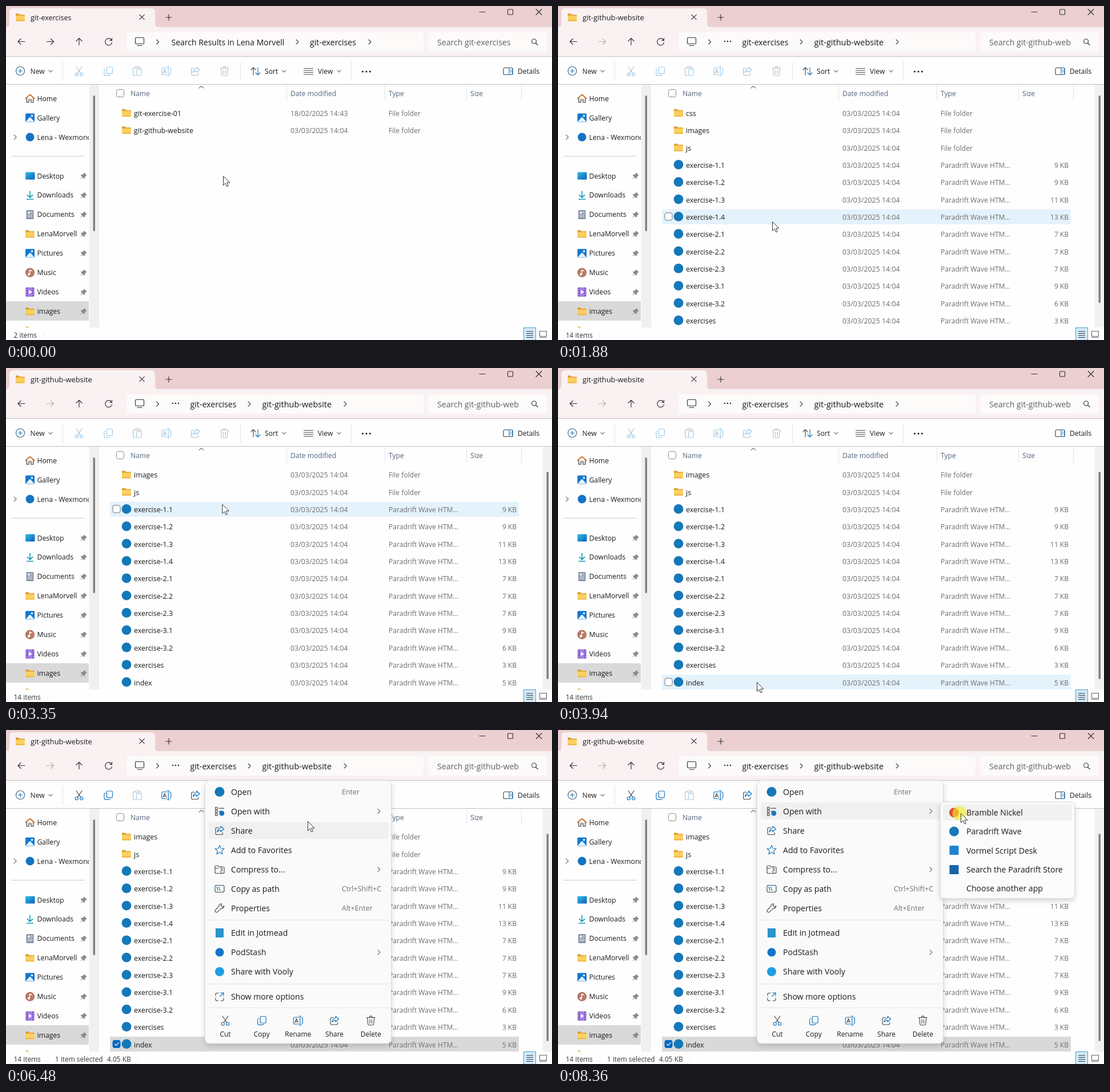
Animation of 956 by 586 pixels, one loop 8590 ms. Source, as an HTML page:

```html
<!DOCTYPE html>
<html lang="en">
<head>
<meta charset="utf-8">
<title>File window</title>
<style>
html, body { margin: 0; width: 100%; height: 100%; overflow: hidden; background: #fff; }
svg { display: block; width: 956px; height: 586px; --c: #1673b8; --k: #4a4a4a; }
text { font-family: "Open Sans", "Noto Sans", sans-serif; white-space: pre; }
.off { --c: #9dcbea; --k: #b9bec4; }
.c, .k, .ln { fill: none; stroke-width: 1.15; stroke-linecap: round; stroke-linejoin: round; }
.c { stroke: var(--c); }
.k { stroke: var(--k); }
.ln { stroke: #333; }
.pop { filter: drop-shadow(0 4px 5px rgba(0,0,0,.16)); }
</style>
</head>
<body>
<svg id="stage" viewBox="0 0 956 586" xmlns="http://www.w3.org/2000/svg"></svg>
<script>
const LOOP = 8590;
const INK = '#1b1b1b', GREY = '#6e6e6e', HEAD = '#52647d';

// ---------- drawing helpers ----------
const text = (x, y, s, size = 12.2, fill = INK, extra = '') =>
  `<text x="${x}" y="${y}" font-size="${size}" fill="${fill}" ${extra}>${s}</text>`;
const rect = (x, y, w, h, fill, extra = '') =>
  `<rect x="${x}" y="${y}" width="${w}" height="${h}" fill="${fill}" ${extra}/>`;
const dot = (x, y, r, fill, extra = '') =>
  `<circle cx="${x}" cy="${y}" r="${r}" fill="${fill}" ${extra}/>`;
const path = (d, cls = 'ln', extra = '') => `<path d="${d}" class="${cls}" ${extra}/>`;
const icon = (id, x, y, cls = '') => `<use href="#${id}" x="${x}" y="${y}" class="${cls}"/>`;
const right = (x, y, s = 4, col = '#444') =>
  path(`M${x - s / 2} ${y - s}l${s} ${s}l${-s} ${s}`, 'ln', `style="stroke:${col}"`);
const down = (x, y) => path(`M${x - 3} ${y - 1.5}l3 3l3-3`, 'ln', 'style="stroke:#777"');
const vline = (x, y, h, col = '#e4e4e4') => rect(x, y, 1, h, col);
const cross = (x, y, s) => path(`M${x - s} ${y - s}l${2 * s} ${2 * s}m0 ${-2 * s}l${-2 * s} ${2 * s}`);

const icons = {
  folder: `<path d="M-8-5.5q0-1.2 1.2-1.2h4l2 2h7.600q1.200 0 1.200 1.200v3h-16z" fill="#dd9f33"/>` +
    rect(-8, -3.2, 16, 9.7, '#fbd060', 'rx="1.2"') + rect(-8, 4.6, 16, 1.9, '#eeb544', 'rx=".9"'),
  cut: path('M-5-8L2.700 3.400M5-8L-2.700 3.400', 'k') +
    dot(-4.2, 5.6, 2.6, 'none', 'class="c"') + dot(4.2, 5.6, 2.6, 'none', 'class="c"'),
  copy: rect(-2.5, -7.5, 10, 11.5, 'none', 'rx="2" class="c"') +
    path('M-5-4q-2 .4-2 2.400v6q0 3 3 3h5q2 0 2.400-1.600', 'c'),
  paste: path('M-3-6.500h-2.500q-1.500 0-1.500 1.500v11q0 1.500 1.500 1.500h3.500M3-6.500h2q1.500 0 1.500 1.500v1', 'k') +
    rect(-3, -8, 6, 3, 'none', 'rx="1.2" class="k"') + rect(-1, -3, 8.5, 10.5, 'none', 'rx="1.5" class="c"'),
  rename: path('M1-6h-6.500q-2.500 0-2.500 2.500v7q0 2.500 2.500 2.500h6.500M6-6q2 .5 2 2.500v7q0 2-2 2.500', 'c') +
    path('M3.500-8v16M1.800-8h3.400M1.800 8h3.400', 'c') + path('M-5.500 3.300L-2.800-3.500L0 3.300M-4.700 1.300h3.800', 'k'),
  share: path('M-2-5.500h-2.500q-2.500 0-2.500 2.500v7.500q0 2.500 2.500 2.500h7.500q2.500 0 2.500-2.500v-1', 'k') +
    path('M2-7.500l5.500 4.800L2 2v-2.700q-4 0-6 3.200q.6-6.500 6-7.200z', 'c'),
  trash: path('M-7.500-5.500h15M-2.500-5.800q0-2.400 2.500-2.400t2.500 2.400M-6-5.300l1 11.300q.2 1.700 1.800 1.700h6.400q1.600 0 1.800-1.700l1-11.300M-1.700-2v6.500M1.700-2v6.500', 'k'),
  pin: `<path d="M1-5.500L5.500-1L4.300-.3L2 2.200l.2 2L.8 5.200L-1.800 2.600L-5 5.500l-.5-.5L-2.600 1.800L-5.200-.8L-4.200-2.200l2 .2L.3-4.300z" fill="#858b91"/>`,
  home: path('M-6-.5v7.500h4v-4.500h4v4.500h4v-7.500', 'ln', 'style="stroke:#8d8d8d;stroke-width:2;fill:#e9e6e3"') +
    path('M-7.500 0L0-6.500L7.500 0', 'ln', 'style="stroke:#c9722c;stroke-width:2"'),
  picture: rect(-8, -7.5, 16, 15, '#1679cc', 'rx="1.5"') +
    `<path d="M-7.500 7L-1-.5q1-1 2 0L7.500 7z" fill="#e6f5ff"/>` + dot(3.5, -3.3, 1.7, '#fff'),
  desktop: rect(-8, -6.5, 16.5, 13, 'url(#sea)', 'rx="1.5"'),
  download: path('M0-7v11M-4.500-.3L0 4.200L4.500-.3M-5.500 7h11', 'ln', 'style="stroke:#169bb5;stroke-width:1.6"'),
  doc: rect(-6.5, -8, 13, 16, '#8794a6', 'rx="1.5"') + rect(-4, -5.5, 4, 4, '#e8eef5') +
    path('M2-5h2M2-2.500h2M-4 1h8M-4 4h8', 'ln', 'style="stroke:#e8eef5"'),
  music: dot(0, 0, 8.2, '#b97a68') + path('M-.5 3v-7.500l3.500 1.500', 'ln', 'style="stroke:#fff;stroke-width:1.5"') + dot(-2, 3, 2, '#fff'),
  video: rect(-7.5, -8, 15, 16, '#7b4fc4', 'rx="1.5"') + rect(-4, -7.5, 8, 15, '#a583e6') +
    `<path d="M-2-3.500L3.500 0L-2 3.500z" fill="#fff"/>` +
    path('M-5.800-5.500v11M5.800-5.500v11', 'ln', 'style="stroke:#e3d6fa;stroke-dasharray:1.5 3"'),
  openWith: rect(-7.5, -7, 3.6, 3.6, 'none', 'class="k"') + rect(-7.5, -1.5, 3.6, 3.6, 'none', 'class="k"') +
    rect(-7.5, 4, 3.6, 3.6, 'none', 'class="k"') + path('M-1-5.200h8.500M-1 0h2', 'k') + dot(3.8, 3.5, 4.5, '#1676ba'),
  star: path('M0-8l2.300 5.200l5.700.6l-4.300 3.800l1.300 5.600L0 4.300l-5 2.900l1.300-5.600L-8-2.200l5.700-.6z', 'c'),
  zip: path('M-8-4.500q0-2 2-2h3l2 2h7q2 0 2 2v7.500q0 2-2 2h-12q-2 0-2-2z', 'k') +
    path('M-8-2h6M2.500-4.500v3h2v3h-2v5.500', 'k'),
  route: rect(-8, -6, 16, 12, 'none', 'rx="2.5" class="k"') + path('M-5-3.500l2 6.500M-1.500-3.500l2 6.500', 'c') + path('M3 3h.1M5.500 3h.1', 'c'),
  wrench: path('M3.800-7.500q-5-.5-5 4.300L-7.300 3q-1.500 2 .3 3.600t3.700-.2L2.700.6q5 0 5-4.700l-2.800 2.200l-2.800-2.500z', 'k'),
  more: path('M-2-6.500h-2.500q-2.500 0-2.500 2.500v2M2 7h2.500q2.500 0 2.500-2.500v-2M-7 2v2.500q0 2.500 2.500 2.500h2', 'k') +
    path('M1.500-7h5.500v5.500M6.500-6.500L.5-.5', 'c'),
};

const defs = `<defs>
<linearGradient id="sea" x2="1" y2="1"><stop stop-color="#35c0e8"/><stop offset="1" stop-color="#0a5fb8"/></linearGradient>
<clipPath id="sideClip"><rect y="138" width="145" height="426"/></clipPath>
<clipPath id="listClip"><rect x="164" y="168" width="776" height="396"/></clipPath>
<clipPath id="findClip"><rect x="740" y="46" width="158.500" height="36"/></clipPath>
<clipPath id="menuClip"><rect id="menuBox" x="330" y="0" width="360" height="586"/></clipPath>
<clipPath id="subClip"><rect id="subBox" x="650" y="0" width="290" height="400"/></clipPath>
${Object.entries(icons).map(([id, s]) => `<g id="${id}">${s}</g>`).join('')}</defs>`;

// ---------- fixed parts ----------
function frameParts() {
  let s = rect(0, 0, 956, 586, '#fefefe') + rect(0, 0, 956, 38, '#ecd0d1') + rect(0, 37, 956, 51, '#f9f1f2');
  s += '<path d="M0 37q6 0 6-6V11q0-7 7-7h241q7 0 7 7v20q0 6 6 6z" fill="#f9f1f2"/>';
  s += icon('folder', 25, 20) + cross(238, 19.5, 4.2) + path('M280 20h10M285 15v10');
  s += path('M829 10.500h10') + rect(878.5, 6, 9, 9, 'none', 'rx="1" class="ln"') + cross(933, 10.5, 5);
  s += rect(211, 46, 520, 34, '#fdfafa', 'rx="4"') + rect(739, 46, 207, 34, '#fdfafa', 'rx="4"');
  s += path('M33 62.500h-12m5-5l-5 5l5 5M128 68.500v-12m-5 5l5-5l5 5');
  s += path('M185 60a6 6 0 1 0 .6 4M185.500 56.500v3.800h-3.800');
  s += rect(226.5, 55.5, 15, 11, 'none', 'rx="1.5" class="ln"') + path('M230 69.500h8') + right(265.5, 63);
  s += dot(924.5, 62, 4, 'none', 'class="ln"') + path('M927.500 65l3.500 3.500');
  s += rect(0, 88, 956, 1, '#cbb9bb') + rect(0, 137, 956, 1, '#c8bbbc');
  // command bar
  s += dot(25, 114, 7.5, 'none', 'class="ln" style="stroke:#3a5f7d"') + path('M21.500 114h7M25 110.500v7', 'c');
  s += text(42.5, 119, 'New') + down(78, 114.5);
  s += [99, 410, 604].map(x => vline(x, 98, 33)).join('');
  s += path('M433 121v-13m-4 4l4-4l4 4', 'k') + path('M441 108v13m-4-4l4 4l4-4', 'c');
  s += text(453, 119, 'Sort') + down(487, 114.5);
  s += [109.5, 113, 116.5, 120].map(y => path(`M521.500 ${y}h16`, 'k')).join('');
  s += text(546, 119, 'View') + down(583, 114.5);
  s += [624.5, 631, 637.5].map(x => dot(x, 115, 1.6, '#222')).join('');
  s += rect(871, 108.5, 16, 12, 'none', 'rx="2" class="k"') + path('M881 108.500h4q2 0 2 2v8q0 2-2 2h-4zM883 112.500h2M883 115.500h2', 'c');
  s += text(896, 119, 'Details', 12);
  // column heads
  s += rect(193.5, 146.5, 13, 13, '#fff', 'rx="3" stroke="#888"') + path('M338 144l4-3.500l4 3.500', 'ln', 'style="stroke:#777"');
  [[218, 'Name'], [498, 'Date modified'], [670, 'Type'], [813, 'Size']].forEach(([x, h]) => s += text(x, 158, h, 12.1, HEAD));
  s += [491, 663, 806, 902].map(x => vline(x, 139, 28)).join('');
  // status bar buttons
  s += rect(906.5, 564.5, 21, 23, '#d3ebfa', 'stroke="#4aa0d0"');
  s += [571, 574.5, 578, 581.5].map(y => path(`M911.500 ${y}h11`)).join('');
  s += rect(934.5, 570.5, 12, 9, 'none', 'class="ln" style="stroke:#666"') + path('M934.500 581.500h12', 'ln', 'style="stroke:#666"');
  return s;
}

function sidePane() {
  const top = [['home', 'Home'], ['picture', 'Gallery'], ['', 'Lena - Wexmond']];
  const pinned = [['desktop', 'Desktop'], ['download', 'Downloads'], ['doc', 'Documents'], ['folder', 'LenaMorvell'],
    ['picture', 'Pictures'], ['music', 'Music'], ['video', 'Videos'], ['folder', 'images']];
  let s = rect(0, 518, 145, 34, '#d9d9d9');
  const entry = (id, label, y) => (id ? icon(id, 42, y) : dot(42, y, 7.5, '#1473c4')) + text(54.5, y + 4.5, label);
  top.forEach(([id, label], i) => s += entry(id, label, 162 + 34 * i));
  s += right(16, 230, 4, '#777') + rect(9, 263, 128, 1, '#c9c9c9');
  pinned.forEach(([id, label], i) => s += entry(id, label, 298 + 33.95 * i) + icon('pin', 136, 298 + 33.95 * i));
  s += icon('folder', 42, 569.5);
  return `<g clip-path="url(#sideClip)">${s}</g>` + rect(146, 138, 17, 426, '#f0f0f0') +
    rect(152.5, 157, 3.5, 238, '#818181', 'rx="1.7"');
}

// ---------- changing parts ----------
function heading(inside) {
  const name = inside ? 'git-github-website' : 'git-exercises';
  let s = text(43, 24.5, name, inside ? 12.85 : 12.5);
  s += path('M71.500 62.500h12m-5-5l5 5l-5 5', 'ln', inside ? 'style="stroke:#b5adae"' : '');
  if (inside) {
    s += [292, 297, 302].map(x => dot(x, 62, 1.2, '#222')).join('') + text(322.5, 68.5, 'git-exercises', 14.2) +
      right(426, 63) + text(448.5, 68.5, name, 14.5) + right(594, 63);
  } else {
    s += text(289.5, 68.5, 'Search Results in Lena Morvell', 14) + right(510, 63) +
      text(532, 68.5, name, 14.2) + right(637, 63);
  }
  return s + `<g clip-path="url(#findClip)">${text(755, 68.5, 'Search ' + name, 14.1, '#626262')}</g>`;
}

const tools = (picked, shareable) =>
  ['cut', 'copy', 'paste', 'rename', 'share', 'trash'].map((id, i) => {
    const on = picked && id !== 'paste' && (id !== 'share' || shareable);
    return icon(id, 128 + 50.9 * i, 114.5, on ? '' : 'off');
  }).join('');

const STAMP = '03/03/2025 14:04';
const outer = [['git-exercise-01', '18/02/2025 14:43'], ['git-github-website', STAMP]];
const pages = ['1.1 9', '1.2 9', '1.3 11', '1.4 13', '2.1 7', '2.2 7', '2.3 7', '3.1 9', '3.2 6']
  .map(p => p.split(' ')).map(([n, kb]) => ['exercise-' + n, STAMP, kb]);
const inner = [...['css', 'images', 'js'].map(n => [n, STAMP]), ...pages, ['exercises', STAMP, 3], ['index', STAMP, 5]];
const rowY = (i, shift) => 188.3 + 30.35 * i - shift;

function checkBox(y, on) {
  return rect(187, y - 7.5, 13, 13, on ? '#0067c0' : '#fff', `rx="3" stroke="${on ? '#0067c0' : '#777'}"`) +
    (on ? path(`M190.500 ${y - 1}l2.300 2.500l4.500-5`, 'ln', 'style="stroke:#fff"') : '');
}

function fileList(rows, shift, hover, chosen, chosenFill) {
  let s = '';
  rows.forEach(([name, date, kb], i) => {
    const y = rowY(i, shift), base = y + 4.6;
    if (i === chosen || i === hover) {
      s += rect(182, y - 13.8, 716, 26.5, i === chosen ? chosenFill : '#e4f2fc') + checkBox(y, i === chosen);
    }
    s += kb ? dot(211, y - 1, 8.4, '#1478b9') : icon('folder', 211, y - 0.8);
    s += text(224, base, name, 12.4) + text(498, base, date, 12.4, GREY);
    s += text(670, base, kb ? 'Paradrift Wave HTM...' : 'File folder', 12.1, GREY);
    if (kb) s += text(894, base, kb + ' KB', 12, GREY, 'text-anchor="end"');
  });
  return `<g clip-path="url(#listClip)">${s}</g>`;
}

const scrollBar = (y, tail) => rect(940, 138, 16, tail - 138, '#f1f1f1') + rect(946.5, y, 3.5, 364, '#818181', 'rx="1.700"');

function status(count, picked, size) {
  const end = count > 9 ? 73 : 66;
  return text(13.5, 581.5, count + ' items', 11.9, '#333') + vline(end, 571, 12, '#ececec') +
    (picked ? text(86, 581.5, '1 item selected', 11.85, '#333') : '') +
    (size ? text(177, 581.5, size, 11.9, '#333') + vline(230, 571, 12, '#ececec') : '');
}

const menuItems = [
  [108.5, '', 'Open', 'Enter'], [142.5, 'openWith', 'Open with', '>'], [176.5, 'share', 'Share'],
  [210.5, 'star', 'Add to Favorites'], [244.5, 'zip', 'Compress to...', '>'], [278.5, 'route', 'Copy as path', 'Ctrl+Shift+C'],
  [312.5, 'wrench', 'Properties', 'Alt+Enter'], [356, 'note', 'Edit in Jotmead'], [390, 'cloud', 'PodStash', '>'],
  [424, 'chat', 'Share with Vooly'], [468, 'more', 'Show more options']];
const badges = {
  '': dot(374, 108.5, 8.5, '#1478b9'), note: rect(367, 348, 14, 16, '#2a94cc'),
  cloud: dot(374, 390, 7.5, '#1473c4'), chat: dot(374, 424, 8, '#1f9fe0'),
};

function menu(top, lit) {
  let s = '';
  menuItems.forEach(([y, id, label, hint], i) => {
    if (i === lit) s += rect(355, y - 15.5, 315, 30, '#f0f0f0', 'rx="4"');
    s += (badges[id] || icon(id, 374, y)) + text(394, y + 5, label, 14.1);
    if (hint === '>') s += right(653, y, 4, '#777');
    else if (hint) s += text(588, y + 4.5, hint, 12.5, GREY);
  });
  s += [333, 445, 487].map(y => rect(352, y, 320, 1, '#e3e3e3')).join('');
  [['cut', 'Cut'], ['copy', 'Copy'], ['rename', 'Rename'], ['share', 'Share'], ['trash', 'Delete']].forEach(([id, label], i) => {
    const x = 384 + 63.7 * i;
    s += icon(id, x, 510) + text(x, 538, label, 12, INK, 'text-anchor="middle"');
  });
  return rect(348.5, top + .5, 326, 549.5 - top, '#fafafa', 'rx="7" stroke="#dcdcdc" class="pop"') +
    `<g clip-path="url(#menuClip)">${s}</g>`;
}

function subMenu(h, lit) {
  const items = ['Bramble Nickel', 'Paradrift Wave', 'Vormel Script Desk', 'Search the Paradrift Store', 'Choose another app'];
  const marks = [dot(693.5, 145, 8.5, '#dd4b3e'), dot(693.5, 178, 8.5, '#1478b9'),
    rect(685.5, 203, 16, 16, '#1f84cf'), rect(685.5, 237, 16, 16, '#1763a8')];
  const s = items.map((label, i) => (i === lit ? rect(674, 130, 226, 29, '#f1f1f1', 'rx="4"') : '') +
    (marks[i] || '') + text(715, 150 + 33.3 * i, label, 14.1)).join('');
  return rect(669.5, 126.5, 235, h, '#fbfbfb', 'rx="7" stroke="#dcdcdc" class="pop"') +
    `<g clip-path="url(#subClip)">${s}</g>`;
}

// ---------- timing ----------
// Share of a move done when it advances in n even jumps from a to b.
const jumps = (t, a, b, n) => t < a ? 0 : Math.min(1, (Math.floor((t - a) / (b - a) * (n - 1) + .1) + 1) / n);

const moves = [
  [60, 750, 11, [[380, 298], [345, 222]]],
  [1750, 2210, 8, [[345, 222], [350, 268], [364, 334], [375, 378], [378, 383], [380, 345], [382, 285], [384, 215], [384, 181]]],
  [3210, 3940, 12, [[384, 181], [348, 551]]],
  [5510, 6320, 12, [[348, 551], [530, 166]]],
  [6390, 6800, 7, [[530, 166], [529, 164], [528, 160], [526, 154], [524, 148], [522, 143], [520, 140], [519, 139]]],
  [7070, 7830, 11, [[519, 139], [705, 146]]]];

function pointer(t) {
  const [a, b, n, pts] = moves.filter(m => t >= m[0]).pop() || moves[0];
  let p = jumps(t, a, b, n);
  if (pts.length === 2) p = p * p * (3 - 2 * p);
  const f = p * (pts.length - 1), i = Math.min(Math.floor(f), pts.length - 2), u = f - i;
  return [0, 1].map(k => pts[i][k] + (pts[i + 1][k] - pts[i][k]) * u);
}

const within = (t, ...spans) => spans.some(([a, b]) => t >= a && t < b);

const stage = document.getElementById('stage');
const layers = ['head', 'tools', 'list', 'status', 'menu', 'sub', 'click', 'cursor'];
stage.innerHTML = defs + frameParts() + sidePane() + layers.map(id => `<g id="L-${id}"></g>`).join('');
const shown = {};
function put(id, html) {
  if (shown[id] === html) return;
  shown[id] = html;
  document.getElementById('L-' + id).innerHTML = html;
}

function draw(t) {
  const [x, y] = pointer(t);
  const inside = t >= 1410, loading = within(t, [1340, 1410]);
  const rows = inside ? inner : outer;
  const shift = t < 2740 ? 0 : t < 3010 ? 15.2 : 30.95;
  const chosen = within(t, [1000, 1340]) ? 1 : t >= 4340 ? 13 : -1;
  const hover = t < 4340 ? rows.findIndex((r, i) => Math.abs(y - rowY(i, shift) + .5) < 13.3) : -1;
  const filePicked = t >= 4810;

  put('head', heading(inside));
  put('tools', tools(within(t, [1000, 1410]) || filePicked, filePicked));
  put('list', loading
    ? text(520, 198, 'Working on it...', 12.1, GREY) + scrollBar(157, 546)
    : fileList(rows, shift, hover, chosen, t >= 5100 ? '#d9d9d9' : '#cce8ff') +
      (inside ? scrollBar(shift ? 182 : 157, 564) : ''));
  put('status', loading ? status(0) : status(rows.length, within(t, [1000, 1340]) || filePicked, filePicked ? '4.05 KB' : ''));

  if (t >= 5100) {
    const top = t >= 5510 ? 88 : 550 - 430 * jumps(t, 5100, 5370, 4);
    const lit = t >= 7070 ? 1 : t >= 5510 ? menuItems.findIndex(m => Math.abs(y - m[0]) < 17) : -1;
    document.getElementById('menuBox').setAttribute('y', top);
    put('menu', menu(top, lit));
  } else put('menu', '');

  if (t >= 7070) {
    const h = 169 * Math.min(1, .4 + .3 * Math.floor((t - 7070) / 70));
    document.getElementById('subBox').setAttribute('height', 126 + h);
    put('sub', subMenu(h, x > 670 ? 0 : -1));
  } else put('sub', '');

  const pressed = within(t, [1000, 1130], [1200, 1340], [4340, 4540], [8360, LOOP]);
  put('click', pressed ? dot(x - 2, y, 12.5, '#f6ec1e', 'opacity=".65"') : '');
  put('cursor', `<path transform="translate(${x.toFixed(2)} ${y.toFixed(2)})" d="M.5.5v16l3.700-3.500l2.500 5.800l2.600-1.100l-2.500-5.700h5.200z" fill="#fff" stroke="#333" stroke-linejoin="round"/>`);
}

const start = performance.now();
function tick() {
  draw((performance.now() - start) % LOOP);
  requestAnimationFrame(tick);
}
tick();
</script>
</body>
</html>
```
